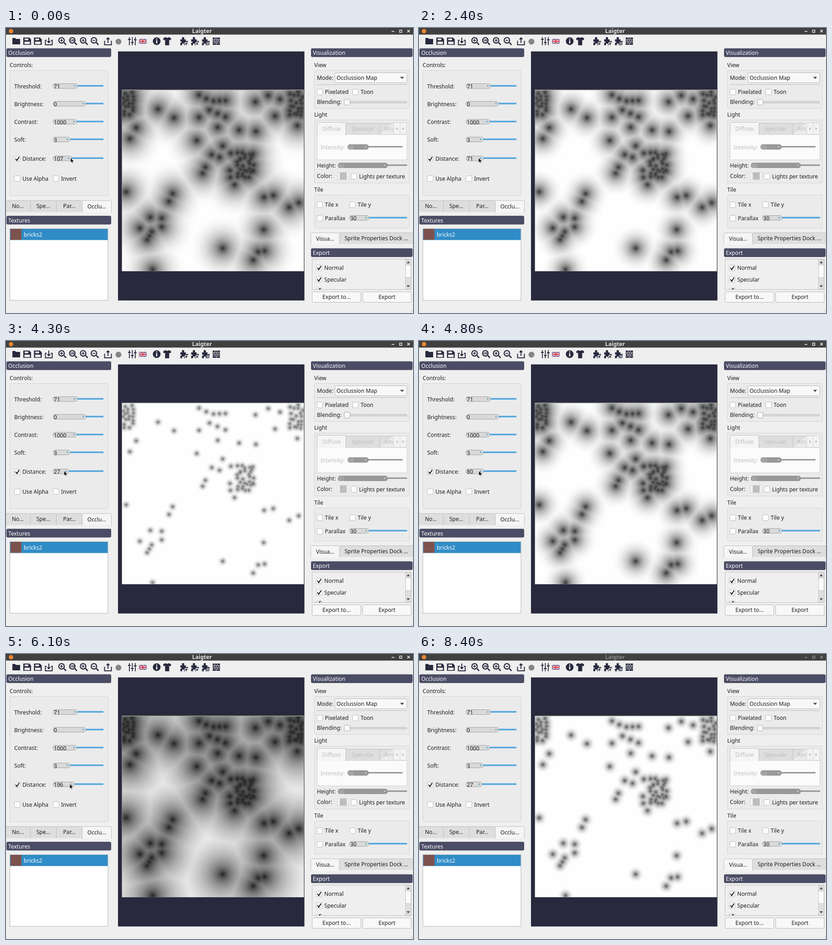
An HTML page with a canvas for the animation above (8.5 s loop, 894 by 627 pixels).

```html
<!DOCTYPE html>
<html lang="en">
<head>
<meta charset="utf-8">
<title>Occlusion map</title>
<style>
html, body { margin: 0; width: 100%; height: 100%; overflow: hidden; background: #efefef; }
svg { position: absolute; left: 0; top: 0; }
text { font: 12.1px "Noto Sans", sans-serif; white-space: pre; }
#map { position: absolute; left: 255px; top: 136.5px; width: 399px; height: 398px; overflow: hidden; }
canvas { position: absolute; left: -8px; top: -8px; filter: blur(1.8px); }
</style>
</head>
<body>
<svg id="ui" width="894" height="627" viewBox="0 0 894 627"></svg>
<div id="map"><canvas width="416" height="414"></canvas></div>
<script>
const INK = '#28293d', BLUE = '#55a8de', LOOP = 8500;

// ---- drawing helpers ----
const box = (x, y, x2, y2, fill, stroke = 'none', r = 0) =>
  `<rect x="${x}" y="${y}" width="${x2 - x}" height="${y2 - y}" rx="${r}" fill="${fill}" stroke="${stroke}"/>`;
const path = (d, stroke, width = 1, fill = 'none') =>
  `<path d="${d}" stroke="${stroke}" stroke-width="${width}" fill="${fill}"/>`;
const dot = (x, y, r, fill) => `<circle cx="${x}" cy="${y}" r="${r}" fill="${fill}"/>`;
const label = (x, cy, s, fill = '#1c1c1c', more = '') =>
  `<text x="${x}" y="${cy + 4.4}" fill="${fill}" ${more}>${s}</text>`;
const centered = (x, cy, s, fill) => label(x, cy, s, fill, 'text-anchor="middle"');
const header = (x, y, x2, s) => box(x + .5, y + .2, x2 - .5, y + 18.3, '#4b4c65', '#44455c', 2) +
  label(x + 4, y + 9.7, s, '#fff');
const group = (x, y, x2, y2) => box(x + .5, y + .5, x2, y2, '#ebebeb', '#d3d3d3', 2);
const check = (x, y, s, on) => box(x + .5, y + .5, x + 13, y + 13, '#fdfdfd', '#bcbcbc', 1) +
  (on ? path(`M${x + 3} ${y + 6.5}l3 4l5 -8`, '#111', 2) : '') + label(x + 18, y + 6.7, s);
const button = (x, x2, s) => box(x, 580.5, x2, 603.5, '#f8f8f8', '#b7b7b7', 2) + centered((x + x2) / 2, 592, s);
const slider = (x, end, x2, cy, s, { off = false, id = '' } = {}) =>
  `<g id="${id}">` + path(`M${end} ${cy - .7}H${x2}`, off ? '#929292' : BLUE, off ? 3 : 3.6) +
  box(x + .5, cy - 5.5, end, cy + 5, off ? '#999' : '#d9d9d9', off ? '#8c8c8c' : '#a0a0a0', 4.5) +
  box(end - 7, cy - 1.8, end - 4.6, cy + .6, off ? '#ddd' : '#2f8fc8') +
  label(off ? x : x + 2, cy + .6, s, off ? '#bdbdbd' : '#1c1c1c') + '</g>';
const tab = (x, y, x2, y2, s, active, color) =>
  path(`M${x + .5} ${y2}V${y + 2.5}q0 -2 2 -2H${x2 - 2.5}q2 0 2 2V${y2}`, '#bdbdbd', 1, active ? '#f5f5f5' : '#dedede') +
  centered((x + x2) / 2, (y + y2) / 2 + (active ? .5 : 0), s, color);
const icon = (x, d, fill = INK, stroke = 'none', width = 2) =>
  `<path transform="translate(${x} 20)" d="${d}" fill="${fill}" stroke="${stroke}" stroke-width="${width}" fill-rule="evenodd"/>`;
const repeat = (n, draw) => Array.from({ length: n }, (_, i) => draw(i)).join('');

// ---- title bar and toolbar ----
const disk = 'M1 1H14L18 5V17H1ZM4 3V7H12V3ZM3.500 10H15.500V15.500H3.500Z';
const lens = 'M7 0A7 7 0 1 1 7 14.4A7 7 0 1 1 7 0M7 2.3A4.8 4.8 0 1 0 7 12A4.8 4.8 0 1 0 7 2.3M11 12.5L13 10.8L18 16L16 18Z';
const puzzle = 'M1 5H5Q3 0 7 0Q11 0 9 5H13V9Q18 7 18 10.5Q18 14 13 12V18H9Q10 14 7 14Q4 14 5 18H1V12Q4 13 4 11Q4 9 1 10Z';
const zoomMarks = ['M4 7.2H10M7 4.2V10.2', 'M4 5V9.5M6 5.2H7.3V9H6ZM9 5.2H10.5V9H9Z', 'M4 7.2H10M7 4.2V10.2', 'M4 7.2H10'];
const badges = ['m-3 0h6m-3 -3v6', 'm-2 -2l4 4m0 -4l-4 4', 'm0 -2.500a2.500 2.500 0 1 0 .1 0'];

const toolbar = () => box(0, 0, 894, 14.5, '#404040') + dot(11, 7, 4.8, '#ee8730') +
  '<g id="title">' + label(430.5, 6.5, 'Laigter', '#e4e4e4', 'text-anchor="middle" style="font-weight:700"') +
  path('M847 7.500H853M881.500 4L887 9.500M887 4L881.500 9.500', '#f4f4f4', 1.6) +
  path('M864.500 4.500H869.500V9.500H864.500Z', '#f4f4f4', 1.3) + '</g>' +
  repeat(4, i => dot(4, 22 + i * 4, .6, '#d0d0d0') + dot(375, 22 + i * 4, .6, '#ddd')) +
  icon(13, 'M1 2H7L9 4H18V16H1Z') + icon(37, disk) + icon(60.5, disk) +
  icon(84.5, 'M1 6H5V8H3V16H16V8H14V6H18V18H1ZM8.500 1H10.500V9H14L9.500 14L5 9H8.500Z') +
  zoomMarks.map((d, i) => icon(115 + 23.7 * i, lens) + icon(115 + 23.7 * i, d, 'none', INK, i == 1 ? 1 : 1.7)).join('') +
  icon(214.5, 'M1 8H3V16H16V8H18V18H1ZM8.500 13H10.500V5H14L9.500 0L5 5H8.500Z') + dot(247, 30, 6.5, '#858585') +
  icon(268, 'M3 0V18M9.500 0V18M16 0V18M0 5H6M6.500 12H12.500M13 6H19', 'none', INK, 1.8) +
  box(292, 24, 309, 34.5, '#29337a') + path('M292 24L309 34.500M309 24L292 34.500', '#fff', 2) +
  path('M292 24L309 34.500M309 24L292 34.500', '#c8324a', .7) +
  path('M300.500 24V34.500M292 29.200H309', '#fff', 4) + path('M300.500 24V34.500M292 29.200H309', '#d02038', 2) +
  dot(331, 29, 8.5, INK) + path('M331 27V34M331 23V25.300', '#fff', 2.4) +
  icon(345, 'M5 0Q9 3 13 0L18 3L16.500 7L13.500 6V18H4.500V6L1.500 7L0 3Z') +
  badges.map((d, i) => icon(382 + 23.8 * i, puzzle) + dot(396 + 23.8 * i, 34.5, 4, '#efefef') +
    path(`M${396 + 23.8 * i} 34.5${d}`, INK, 1.6)).join('') +
  icon(453, 'M1 1H17V17H1Z') +
  icon(453, 'M1 5H17M1 9H17M1 13H17M6 1V5M11 1V5M4 5V9M9 5V9M14 5V9M6 9V13M11 9V13M9 13V17', 'none', '#efefef', .9);

// ---- docks ----
const control = (name, value, y, end) => label(18, y + .3, name) + slider(103, end, 214, y, value);

const leftDock = () => header(1, 45, 231, 'Occlusion') + label(8, 82, 'Controls:') + group(8, 93, 224, 369) +
  control('Threshold:', 71, 128, 157) + control('Brightness:', 0, 167, 175) +
  control('Contrast:', 1000, 206.5, 155) + control('Soft:', 3, 245.5, 141) +
  check(18, 281, 'Distance:', true) + slider(103, 143, 214, 287, 107, { id: 'distance' }) +
  check(18, 324.5, 'Use Alpha') + check(103, 324.5, 'Invert') +
  tab(-2, 379, 54, 405, 'No...') + tab(53, 379, 111, 405, 'Spe...') + tab(110, 379, 168, 405, 'Par...') +
  tab(167, 379, 232, 406, 'Occlu...', true) + header(1, 413.5, 231, 'Textures') +
  box(8.5, 441.5, 224, 599, '#fff', '#b4b4b4') + box(9, 442, 223.5, 466.5, '#308cc6') + box(10, 442, 34, 466, '#85554f') +
  repeat(6, row => path(`M10 ${442.5 + row * 4}H34M${14 + row % 2 * 4} ${442 + row * 4}v4m9 -4v4`, '#664a4a', .8)) +
  label(39, 454.5, 'bricks2', '#fff');

const faint = '#bdbdbd';
const rightDock = () => header(670, 45, 893, 'Visualization') + label(677, 82, 'View') + group(677, 93, 886, 177) +
  label(683, 109.5, 'Mode:') + box(722.5, 98.5, 880.5, 120.5, '#f8f8f8', '#b4b4b4', 2) + label(726, 109.5, 'Occlussion Map') +
  path('M865.500 107.500H874.500L870 112Z', 'none', 0, '#444') + path('M683 124.500H881', '#b9b9b9') +
  check(682.5, 134, 'Pixelated') + check(761, 134, 'Toon') + label(683, 163, 'Blending:') +
  box(750, 161.5, 880.5, 165, '#dcdcdc', '#b9b9b9', 1.5) + box(743, 157, 755.5, 169.5, '#fafafa', '#a9a9a9', 2) +
  label(677, 191, 'Light') + group(677, 202, 886, 341) + box(683.5, 234.5, 880.5, 290, '#fbfbfb', '#cfcfcf') +
  tab(746, 209, 821, 234.5, 'Specular', false, faint) + path('M850 209.500H820.500V234.500', '#c4c4c4', 1, '#dedede') +
  label(831, 222, 'Am', faint) + tab(683, 207, 747, 235.5, 'Diffuse', true, faint) +
  box(851.5, 208.5, 865.5, 234, '#f3f3f3', '#d0d0d0') + box(865.5, 208.5, 880, 234, '#f3f3f3', '#d0d0d0') +
  path('M860 218.500V224.500L856.500 221.500ZM871 218.500V224.500L874.500 221.500Z', 'none', 0, '#b0b0b0') +
  label(691, 262.5, 'Intensity:', faint) + slider(750, 796, 871, 262, 60, { off: true }) +
  label(683, 303, 'Height:') + slider(729, 838, 881, 302.5, 30, { off: true }) +
  label(683, 326, 'Color:') + box(728.5, 317.5, 752, 334, '#f7f7f7', '#d5d5d5') + box(733, 318, 748.5, 333.5, '#bdbdbd') +
  check(757.5, 319.5, 'Lights per texture') +
  label(677, 356, 'Tile') + group(677, 367, 886, 440) + check(682.5, 382, 'Tile x') + check(754.5, 382, 'Tile y') +
  check(682.5, 412, 'Parallax') + slider(754, 797, 881, 418, 30) +
  tab(669, 450, 733, 477, 'Visua...', true) + tab(732, 450, 895, 475, 'Sprite Properties Dock ...') +
  header(670, 485, 893, 'Export') + box(672.5, 508.5, 890, 575.5, '#efefef', '#bdbdbd') +
  check(681, 521, 'Normal', true) + check(681, 546.5, 'Specular', true) +
  path('M681.500 575V572.500H694V575', '#bcbcbc', 1, '#fff') + path('M688 575L691 572.500', '#111', 2) +
  box(877.5, 509, 889.5, 575, '#dedede', '#c6c6c6') + box(877.5, 521.5, 889.5, 549, '#fafafa', '#c0c0c0') +
  path('M880 517.500H887L883.500 513ZM880 566H887L883.500 570.500Z', 'none', 0, '#444') +
  button(672.5, 779.5, 'Export to...') + button(783.5, 890, 'Export') +
  path('M888 625L892 621M891 625L893 623', '#c8c8c8');

const $ = id => document.getElementById(id);
$('ui').innerHTML = toolbar() + leftDock() + rightDock() + box(246, 51.5, 655.5, 599.5, INK) +
  box(254.4, 135.6, 654.6, 535.2, '#a4aa9c') +
  '<path id="cursor" d="M0 0V10L2.400 7.900L4 11.200L5.500 10.500L4 7.300H7Z" fill="#000" stroke="#fff" stroke-width=".5"/>';

// ---- occlusion map: distance to the nearest pit ----
const pits = [];
let seed = 1;
const random = () => { const v = Math.sin(seed++ * 127.1) * 43758.5; return v - Math.floor(v); };

// evenly spaced pits along a line
function chain(x, y, x2, y2, count = 2) {
  for (let i = 0; i < count; i++) {
    const k = i / (count - 1);
    pits.push([x + (x2 - x) * k, y + (y2 - y) * k]);
  }
}
// jittered grid of pits with gaps
function cluster(x1, y1, x2, y2) {
  for (let y = y1; y <= y2; y += 8.2)
    for (let x = x1; x <= x2; x += 8.4)
      if (random() < .8) pits.push([x + random() * 7 - 3.5, y + random() * 7 - 3.5]);
}
cluster(260, 142, 284, 199);
cluster(624, 142, 654, 193);
cluster(509, 276, 550, 328);
chain(492, 313, 493, 328);
chain(424, 147, 440, 155);
chain(456, 160, 482, 159, 3);
chain(447, 180, 482, 195, 3);
chain(424, 196, 419, 247);
chain(334, 178, 369, 197);
chain(286, 219, 272, 243);
chain(465, 218, 476, 259);
chain(512, 224, 549, 227);
chain(548, 162, 591, 193);
chain(576, 148, 602, 156);
chain(640, 214, 643, 384);
chain(452, 278, 469, 284);
chain(494, 275, 502, 344);
chain(438, 306, 432, 319);
chain(264, 360, 294, 440);
chain(366, 364, 358, 381);
chain(317, 416, 342, 418);
chain(342, 437, 320, 448);
chain(567, 372, 587, 368);
chain(622, 394, 566, 443);
chain(315, 457, 310, 465);
chain(554, 492, 568, 490);
chain(476, 484, 543, 510);
chain(322, 531, 322, 531);

const canvas = document.querySelector('canvas'), ctx = canvas.getContext('2d');
const { width, height } = canvas, image = ctx.createImageData(width, height);
const nearest = Float32Array.from({ length: width * height }, (_, i) => {
  const x = i % width + 247.5, y = Math.floor(i / width) + 129;
  let best = Infinity;
  for (const [px, py] of pits) best = Math.min(best, (px - x) ** 2 + (py - y) ** 2);
  return Math.sqrt(best);
});
function shade(distance) {
  const radius = Math.max(7.5, distance * .71);
  nearest.forEach((d, i) => {
    const k = Math.min(1, d / radius);
    image.data.fill(254 * Math.sqrt(k * (2 - k)), i * 4, i * 4 + 3);
    image.data[i * 4 + 3] = 255;
  });
  ctx.putImageData(image, 0, 0);
}

// ---- slider drags: start, end, notch reached ----
const NOTCH = 8.9, FIRST = 12;
const drags = [
  [1350, 1650, 17], [1650, 2000, 12], [2100, 2400, 8], [2850, 3400, 0], [4100, 4800, 9],
  [4800, 5500, 22], [5600, 5800, 24], [5900, 6100, 22], [6200, 7100, 5], [7100, 7300, 3]
];
const progress = (t, from, to) => Math.max(0, Math.min(1, (t - from) / (to - from)));
const notchAt = t => drags.reduce((n, [from, to, goal]) => n + (goal - n) * progress(t, from, to), FIRST);

const [line, pill, handle, value] = $('distance').children;
let shown = -1;

function cursorAt(t, knob) {
  const leave = progress(t, 7900, 8300);
  if (leave == 1) return [-50, 0];
  const x = t < 1400 ? 142 - 4 * progress(t, 500, 700) : knob - 4.2;
  return [x - 70 * leave, 286 - 365 * leave];
}
function draw(now) {
  const t = Math.floor((now % LOOP) / 100) * 100;
  const distance = Math.round(Math.round(notchAt(t)) * NOTCH);
  const mapped = notchAt(t - 50) * NOTCH;   // the map trails the slider a little
  const knob = 130 + distance * .073;
  line.setAttribute('d', `M${knob + 6} 286.3H214`);
  pill.setAttribute('width', knob - 97.5);
  handle.setAttribute('x', knob - 1.2);
  value.textContent = distance;
  $('cursor').setAttribute('transform', `translate(${cursorAt(t, knob)})`);
  $('title').setAttribute('opacity', 1 - .55 * progress(t, 8000, 8400));
  if (mapped !== shown) shade(shown = mapped);
}
const start = performance.now();
(function tick() {
  draw(performance.now() - start);
  requestAnimationFrame(tick);
})();
</script>
</body>
</html>
```
